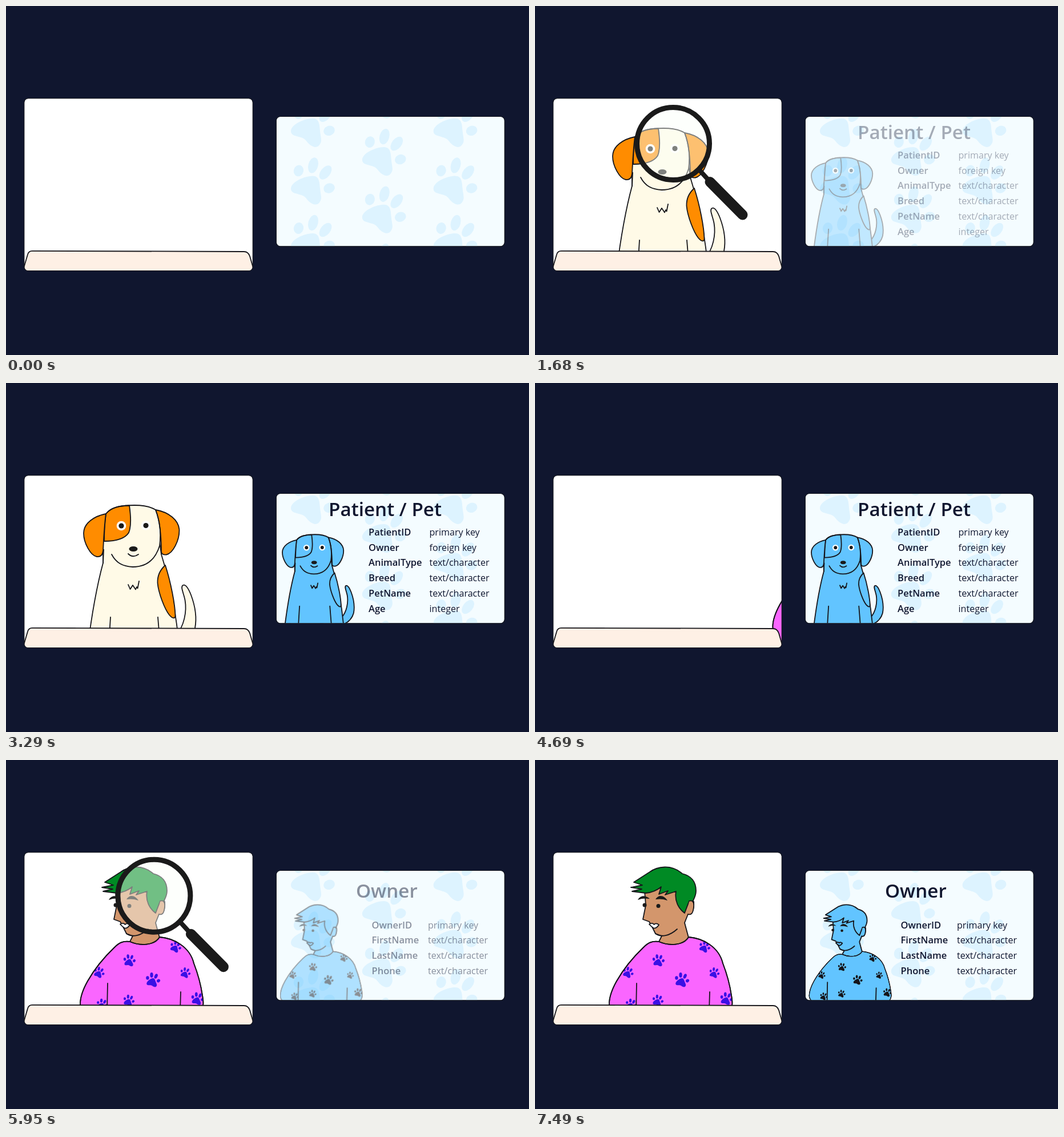
Animation of 916 by 611 pixels, one loop 8 s. Source, as an HTML page:

```html
<!DOCTYPE html>
<html lang="en">
<head>
<meta charset="utf-8">
<title>Patient and owner tables</title>
<style>
  html, body { margin: 0; width: 100%; height: 100%; overflow: hidden; background: #10162f; }
  svg { display: block; width: 100%; height: 100%; }
  .ink { stroke: #15151a; stroke-width: 1.8; stroke-linejoin: round; stroke-linecap: round; }
  .ink * { vector-effect: non-scaling-stroke; }
  .line { fill: none; }
  .dark { fill: #1a1a1a; stroke: none; }
  .fur { fill: var(--fur); }
  .spot { fill: var(--spot); }
  .skin { fill: var(--skin); }
  .hair { fill: var(--hair); }
  .shirt { fill: var(--shirt); }
  .teeth { fill: var(--teeth); }
  .prints { fill: var(--prints); stroke: none; }
  .frame { fill: none; stroke: #14171f; stroke-width: 1.2; }
  .color { --fur: #fffae7; --spot: #ff8c00; --skin: #d3966c; --hair: #008a24;
           --shirt: #fa66ff; --teeth: #fff; --prints: #3a10e5; }
  .blue { --fur: #62c4ff; --spot: #62c4ff; --skin: #62c4ff; --hair: #62c4ff;
          --shirt: #62c4ff; --teeth: #62c4ff; --prints: #15151a; }
  text { font: 16.1px "Open Sans", "Noto Sans", sans-serif; fill: #10162f; }
  .label { font-size: 16.5px; font-weight: 600; }
  .title { font-size: 33.2px; font-weight: 600; }
</style>
</head>
<body>
<svg viewBox="0 0 916 611">
  <defs>
    <clipPath id="sceneClip"><rect x="32" y="162" width="400" height="301.500" rx="7"/></clipPath>
    <clipPath id="cardClip"><rect x="473.500" y="193.800" width="399.500" height="226.700" rx="7"/></clipPath>

    <!-- Paw print centred on its own origin -->
    <g id="paw">
      <ellipse cx="-24.500" cy="-18" rx="8.500" ry="10" transform="rotate(15 -24.500 -18)"/>
      <ellipse cx="1" cy="-27.500" rx="8.500" ry="14" transform="rotate(15 1 -27.500)"/>
      <ellipse cx="22.500" cy="-15" rx="8.500" ry="14" transform="rotate(38 22.500 -15)"/>
      <ellipse cx="29" cy="12.500" rx="10" ry="8.500" transform="rotate(-22 29 12.500)"/>
      <path d="M-38 13C-37 0-12-9 0-9C12-9 12 2 13 13C14 24 17 30 13 36C8 45-2 41-9 33C-15 25-18 25-25 23C-32 21-38 20-38 13Z"/>
    </g>

    <g id="dog" class="ink">
      <path class="fur" d="M310 354C315 352 320 361 324 371C330 387 335 408 331 429C326 447 314 457 296 462L298 441C312 426 317 400 313.500 380C311 367 305 357 310 354Z"/>
      <path class="fur" d="M172 270L170 315C160 352 150 405 142 470H304C299 405 288 352 272 300L268 270Z"/>
      <path class="spot" d="M279 319C270 327 265 338 265.500 350C267 368 278 396 286 406C292 413 296.500 413 296.500 407C296 388 289 350 279 319Z"/>
      <path class="line" d="M183 410L180 460M266 410L270 460"/>
      <path class="line" d="M214 353L217.500 361L222 354L227 361.500L229 357L230.500 359.500L233 347"/>
      <path class="fur" stroke="none" d="M175 229C185 216 205 214 225 214C242 214 254 217 262 222C269 240 272 262 269 285C261 312 244 322 222 322C204 321 193 315 185 300L170 290C170 265 173 245 175 229Z"/>
      <path class="spot" d="M175 229C185 217 200 215 216 214.500C219 235 219 252 215 262C208 273 192 277 172 277C172 260 173 245 175 229Z"/>
      <path class="spot" d="M175 229C155 233 136 245 136 263C136 280 148 302 159 304C166 305 169 301 170 294C171 275 172 250 175 229Z"/>
      <path class="spot" d="M262 222C285 226 303 240 303.500 258C303.500 275 293 298 281 300.500C275 301 272 299 272 295C272 268 269 240 262 222Z"/>
      <path class="line" d="M175 229C185 216 205 214 225 214C242 214 254 217 262 222C269 240 272 262 269 285C261 311 244 322 222 322C204 321 193 315 185 300M170 294V315"/>
      <g stroke="none">
        <circle cx="202" cy="250" r="8.300" fill="#fff"/>
        <circle cx="245" cy="249.500" r="8.300" fill="#fff"/>
        <circle class="dark" cx="202" cy="250" r="4.600"/>
        <circle class="dark" cx="245" cy="249.500" r="4.600"/>
        <ellipse class="dark" cx="223" cy="290.500" rx="7.500" ry="4.600"/>
      </g>
      <path class="line" d="M214 299Q222 307 232 300"/>
    </g>

    <path id="shirtShape" d="M217 318C204 316 197 321 190 328C170 347 155 366 143 387C134 403 130 416 130 427C130 434 135 439 139 444L145 480H335L340 440C347 432 346 424 344 412C341 392 336 374 329 356C322 327 294 312 269 310C260 325 235 326 217 318Z"/>
    <clipPath id="shirtClip"><use href="#shirtShape"/></clipPath>

    <g id="person" class="ink">
      <path class="skin" d="M192 230L194 254L189 279L200 283L206 294L211 304L222 308L217 318C235 327 262 325 269 311L262 285L268 270C275 272 279 262 278 248L262 232L230 222Z"/>
      <path class="line" d="M211 304C221 311 236 308 249 296"/>
      <path class="hair" d="M227 187.500C241 187 251 193 258 199C274 203 282 213 282 229C282 237 279 242 276.500 247H270L262 268C251 260 244 246 247 230L228 236L233 229L217 235L221 222C214 228 205 232 194 233L170 230L187 226L168 223L188 219L173 214L201 196C209 190 217 188 227 187.500Z"/>
      <path class="skin" d="M270 247C275 245 279 248 278 257C277 266 275 272 268 270"/>
      <path class="dark" d="M180 245C184 237 193 236 201 243C193 242 187 242 180 245ZM211 244C217 234 227 238 232 246C224 243 218 243 211 244Z"/>
      <circle class="dark" cx="192" cy="254" r="3.500"/>
      <circle class="dark" cx="216" cy="255.500" r="3.500"/>
      <path class="teeth" d="M200 287.500Q206 284 208.500 288Q212 284.500 217 288.500Q213 295 208 294.500Q204 292 200 287.500Z"/>
      <use class="shirt" href="#shirtShape"/>
      <g id="shirtPrints" class="prints" clip-path="url(#shirtClip)"></g>
      <use class="line" href="#shirtShape"/>
      <path class="line" d="M178 391L177 440M306 406L305 440"/>
    </g>
  </defs>

  <g clip-path="url(#sceneClip)">
    <rect x="31" y="161" width="402" height="304" fill="#fff"/>
    <use id="sceneDog" class="color" href="#dog"/>
    <use id="scenePerson" class="color" href="#person"/>
    <g id="magnifier" stroke="#1a1a1a">
      <path d="M43 43L64 66" stroke-width="8"/>
      <path d="M64.500 67L121.500 124.500" stroke-width="18" stroke-linecap="round"/>
      <circle r="63.500" stroke-width="9" fill="#fbfff8" fill-opacity=".45"/>
    </g>
    <path class="ink" fill="#fef0e5" d="M31.500 457L38 435Q39.500 428.800 46 428.800L417 430Q424 430 427 438L432.500 457V465H31.500Z"/>
  </g>
  <rect class="frame" x="31.800" y="161.700" width="400.500" height="302" rx="7"/>

  <g clip-path="url(#cardClip)">
    <rect x="473" y="193" width="401" height="228" fill="#f4fcff"/>
    <g id="backdrop" fill="#ddf3ff"></g>
    <g id="dogCard">
      <use class="blue" href="#dog" transform="translate(397 128.300) scale(.64)"/>
      <text class="title" x="565" y="233">Patient / Pet</text>
    </g>
    <g id="ownerCard">
      <use class="blue" href="#person" transform="translate(393.500 128.300) scale(.667)"/>
      <text class="title" x="613" y="241">Owner</text>
    </g>
  </g>
  <rect class="frame" x="473.300" y="193.500" width="400" height="227.300" rx="7"/>
</svg>

<script>
const LOOP = 8000, TICK = 70;
const DOG_START = 490, PERSON_START = 4690;
const el = id => document.getElementById(id);

function add(parent, tag, attributes, content = '') {
  const node = document.createElementNS('http://www.w3.org/2000/svg', tag);
  for (const name in attributes) node.setAttribute(name, attributes[name]);
  node.textContent = content;
  parent.append(node);
}

function addPaw(parent, x, y, scale = 1, turn = 0) {
  add(parent, 'use', {
    href: '#paw',
    transform: `translate(${x} ${y}) rotate(${turn}) scale(${scale})`
  });
}

function addFields(card, labelX, typeX, y, fields) {
  fields.forEach(([label, type], i) => {
    add(card, 'text', { class: 'label', x: labelX, y: y + i * 26.7 }, label);
    add(card, 'text', { x: typeX, y: y + i * 26.7 }, type);
  });
}

for (let column = 0; column < 3; column++)
  for (let row = 0; row < 4; row++)
    addPaw(el('backdrop'), 537 + column * 124.8, 205.8 + row * 100.6 - (column % 2) * 50.3);

[[216, 351, .27, -20], [257, 385, .32, -15], [314, 372.5, .23, -10], [163, 372, .24, -5],
 [297, 327, .25, -5], [335, 418, .28, -15], [215, 421, .25, -12], [168, 428, .25, -10]]
  .forEach(print => addPaw(el('shirtPrints'), ...print));

const TEXT = 'text/character';
addFields(el('dogCard'), 635, 741.5, 267, [
  ['PatientID', 'primary key'], ['Owner', 'foreign key'], ['AnimalType', TEXT],
  ['Breed', TEXT], ['PetName', TEXT], ['Age', 'integer']
]);
addFields(el('ownerCard'), 640.5, 739, 294.5, [
  ['OwnerID', 'primary key'], ['FirstName', TEXT], ['LastName', TEXT], ['Phone', TEXT]
]);

const progress = (t, start, duration) => Math.min(1, Math.max(0, (t - start) / duration));
const backOut = u => 1 + 2.70158 * (u - 1) ** 3 + 1.70158 * (u - 1) ** 2;

// Magnifier centre: [ms after the character enters, x, y]
const sweep = [
  [600, 138, 555], [770, 153, 431], [1190, 242, 241], [1890, 220.5, 266],
  [2100, 234.5, 253], [2210, 239, 252], [2450, 217, 341], [2800, 191, 505]
];

// Slope at a key, flat at turning points so the path never overshoots
function slope(i, axis) {
  const before = sweep[i - 1], key = sweep[i], after = sweep[i + 1];
  if (!before || !after) return 0;
  if ((key[axis] - before[axis]) * (after[axis] - key[axis]) <= 0) return 0;
  return (after[axis] - before[axis]) / (after[0] - before[0]);
}

function sweepAt(time, axis) {
  const last = sweep.length - 1;
  if (time <= sweep[0][0]) return sweep[0][axis];
  if (time >= sweep[last][0]) return sweep[last][axis];
  const i = sweep.findIndex(key => key[0] > time) - 1;
  const a = sweep[i], b = sweep[i + 1], span = b[0] - a[0], u = (time - a[0]) / span;
  const blend = u * u * (3 - 2 * u);
  return a[axis] + (b[axis] - a[axis]) * blend
    + span * u * (1 - u) * ((1 - u) * slope(i, axis) - u * slope(i + 1, axis));
}

const move = (id, x, y) => el(id).setAttribute('transform', `translate(${x} ${y})`);

function draw(t) {
  const dogIn = backOut(progress(t, DOG_START - 15, 650));
  const dogOut = progress(t, 3920, 420) ** 2;
  const personIn = backOut(progress(t, PERSON_START - 15, 650));
  move('sceneDog', 0, 300 * (1 - dogIn) + 310 * dogOut);
  move('scenePerson', 320 * (1 - personIn), 0);

  const second = t >= PERSON_START;
  const time = t - (second ? PERSON_START : DOG_START);
  move('magnifier', sweepAt(time, 1) + (second ? 18 : 0), sweepAt(time, 2) - (second ? 4 : 0));

  el('dogCard').setAttribute('opacity', progress(t, 1470, 600) - progress(t, 4960, 600));
  el('ownerCard').setAttribute('opacity', progress(t, 5670, 600));
}

function play() {
  draw(Math.floor(performance.now() % LOOP / TICK) * TICK);
  requestAnimationFrame(play);
}
play();
</script>
</body>
</html>
```
